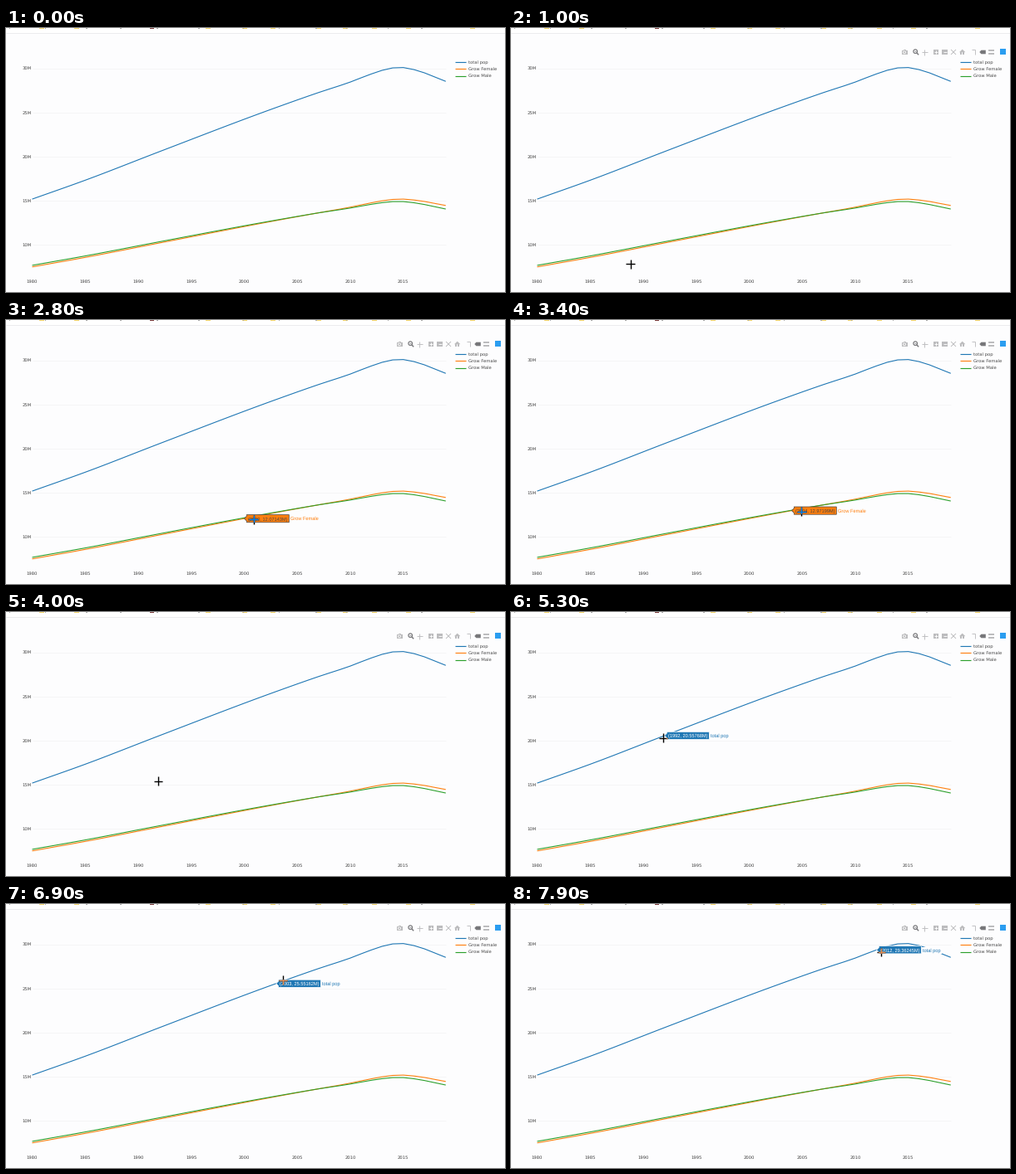
A matplotlib script for the animation above (8000 ms loop, 600 by 318 pixels).

```python
import random

import numpy as np
import matplotlib.pyplot as plt
from matplotlib.animation import FuncAnimation
from matplotlib.colors import to_rgb
from matplotlib.patches import Circle, Polygon, Rectangle

W, H, DPI = 600, 318, 100
PT = 72 / DPI                      # points per pixel
FRAMES, INTERVAL = 80, 100
PAPER, INK, ICON, ACTIVE = "#fdfdfe", "#444444", "#bcbcbe", "#77777a"
BLUE, ORANGE, GREEN = "#1f77b4", "#ff7f0e", "#2ca02c"

plt.rcParams["text.hinting"] = "none"
plt.rcParams["toolbar"] = "None"

fig = plt.figure(figsize=(W / DPI, H / DPI), dpi=DPI, facecolor=PAPER)
ax = fig.add_axes([0, 0, 1, 1])
ax.set_xlim(0, W)
ax.set_ylim(H, 0)
ax.axis("off")


def line(xs, ys, color, width=1.0, z=2, **kw):
    kw.setdefault("solid_capstyle", "butt")
    return ax.plot(xs, ys, color=color, lw=width * PT, zorder=z, **kw)[0]


def rect(x, y, w, h, color, z=2):
    return ax.add_patch(Rectangle((x, y), w, h, fc=color, ec="none", zorder=z))


def poly(points, color):
    return ax.add_patch(Polygon(points, fc=color, ec="none", zorder=2))


def ring(x, y, r, fc, ec, width):
    return ax.add_patch(Circle((x, y), r, fc=fc, ec=ec, lw=width * PT, zorder=3))


def text(x, y, s, size=5.2, color=INK, ha="left", font="DejaVu Sans", z=3):
    return ax.text(x, y, s, fontsize=size * PT, color=color, ha=ha,
                   va="center_baseline", family=font, zorder=z)


# ---------- data ----------
def smooth(x, keys):
    """Cubic Hermite curve through a few (x, y) keys."""
    kx, ky = np.array(keys).T
    slope = np.gradient(ky, kx)
    i = np.clip(np.searchsorted(kx, x, "right") - 1, 0, len(kx) - 2)
    h = kx[i + 1] - kx[i]
    u = (x - kx[i]) / h
    ease = u * u * (3 - 2 * u)
    return (ky[i] * (1 - ease) + ky[i + 1] * ease
            + h * u * (1 - u) * (slope[i] * (1 - u) - slope[i + 1] * u))


years = np.arange(1980, 2020)
total = smooth(years, [
    (1980, 15.18261), (1985, 17.31974), (1992, 20.55768), (2003, 25.55162),
    (2007, 27.2476), (2010, 28.43994), (2012, 29.36245), (2014, 30.04297),
    (2015, 30.08183), (2016, 29.85124), (2019, 28.51583)])
share = np.interp(years, [1980, 2000, 2007, 2019], [.4942, .49825, .5, .507])
female = total * share
series = [("total pop", total, BLUE),
          ("Grow Female", female, ORANGE),
          ("Grow Male", total - female, GREEN)]


def px(year):
    return 31.5 + (year - 1980) * 12.75


def py(millions):
    return 261.2 - (millions - 10) * 10.635


# ---------- browser strip ----------
rng = random.Random(4)
rect(0, 0, W, 5.5, "#ffffff", 0)
line([0, W], [6, 6], "#e8e8ea", 0.8, 1)
for x in (43, 85, 243, 287, 321, 376, 408, 443, 484, 561):
    rect(x - 3, 0, 6, 1, "#f3d56b")
for x in range(8, 545, 45):
    rect(x + rng.uniform(-8, 8), 0, 1.6, 0.8, "#a8a8a8")
rect(173, 0, 5, 1, "#7a3a3a")

# ---------- chart ----------
for m in range(10, 31, 5):
    line([31.5, 529], [py(m)] * 2, "#f3f3f4", 0.8, 1)
    text(31, py(m), f"{m}M", ha="right")
for year in range(1980, 2016, 5):
    text(px(year), 305, str(year), ha="center")
for i, (name, values, color) in enumerate(series):
    line(px(years), py(values), color, 1.1, 4, solid_joinstyle="round")
    y = 41 + 8.25 * i
    line([540.3, 552.8], [y, y], color, 1.15)
    text(556, y, name)


# ---------- toolbar ----------
MID = 29


def stroke(x0, y0, x1, y1, color=ICON, width=0.9):
    """Icon stroke, y measured from the toolbar's centre line."""
    return line([x0, x1], [MID + y0, MID + y1], color, width)


def block(x, y, w, h, color=ICON):
    return rect(x - w / 2, MID + y - h / 2, w, h, color)


tools = [
    # camera
    block(473, 0.3, 7, 5), block(473, -2.6, 3, 1.2),
    ring(473, 29.3, 1.5, ICON, "white", 0.8),
    # zoom
    ring(486.2, 28.2, 2.3, "none", ACTIVE, 1.2),
    stroke(487.8, 0.9, 490.2, 3.3, ACTIVE, 1.4),
    stroke(485, -0.8, 487.4, -0.8, ACTIVE, 0.7),
    # pan
    stroke(493.6, 0, 500.6, 0), stroke(497.1, -3.5, 497.1, 3.5),
    # zoom in, zoom out
    block(511, 0, 6.2, 6), block(521.5, 0, 6.2, 6),
    stroke(509, 0, 513, 0, "white"), stroke(511, -2, 511, 2, "white"),
    stroke(519.5, 0, 523.5, 0, "white"),
    # autoscale
    stroke(529, -3, 535, 3), stroke(529, 3, 535, -3),
    # home
    poly([(539, 29.2), (542.7, 25.7), (546.4, 29.2)], ICON),
    block(541.2, 1.5, 1.9, 3), block(544.2, 1.5, 1.9, 3),
    # spikes
    stroke(554, -2.7, 558.3, -2.7), stroke(558.3, -2.7, 558.3, 2.8),
    # hover modes
    poly([(563.3, 29), (565.4, 26.7), (570.8, 26.7), (570.8, 31.3),
          (565.4, 31.3)], ACTIVE),
    block(577.7, -1.7, 6.5, 2.2), block(577.7, 1.7, 6.5, 2.2),
    block(591.2, -0.2, 7, 7, "#2b9df0"),
]

# ---------- hover label ----------
TIP, BOX_W, HALF = 2.8, 51, 4.6
RIGHT = TIP + BOX_W
BODY = np.array([(0, 0), (TIP, -TIP), (TIP, -HALF), (RIGHT, -HALF),
                 (RIGHT, HALF), (TIP, HALF), (TIP, TIP)])
bubble = ax.add_patch(Polygon(BODY, closed=True, lw=0.7 * PT, zorder=7))
area = Rectangle((0, 0), BOX_W, 2 * HALF, transform=ax.transData)
value_text = text(0, 0, "", 5.7, ha="center", font="Liberation Sans", z=8)
name_text = text(0, 0, "", 5.7, font="Liberation Sans", z=6)
name_text.set_bbox(dict(fc=PAPER, ec="none", pad=1.5 * PT))

# ---------- cursor ----------
ARM = 5.4
cross = [line([], [], "black", 1.4, 9) for _ in range(2)]
inverse = [line([], [], "black", 1.4, 10) for _ in range(2)]

# time in s, x, y
PATH = np.array([
    (0.7, 137, 298), (1.4, 153, 266), (1.7, 205, 255.5), (2.5, 258, 247),
    (2.6, 258, 247), (2.7, 289, 242), (3.5, 358, 229), (4.0, 183, 203.5),
    (4.4, 104, 176), (5.2, 183, 151.5), (5.4, 183, 151.5), (6.3, 283, 112),
    (6.9, 333, 91.8), (7.8, 439, 60), (7.9, 445, 58)])
START = PATH[0, 0]


def cursor_at(t):
    return [np.interp(t, PATH[:, 0], PATH[:, k]) for k in (1, 2)]


def nearest(x, y, reach=10):
    best = None
    for name, values, color in series:
        d = np.hypot(px(years) - x, py(values) - y)
        i = d.argmin()
        if d[i] < reach:
            reach, best = d[i], (name, years[i], values[i], color)
    return best


def place_cross(lines, x, y):
    lines[0].set_data([x - ARM, x + ARM], [y, y])
    lines[1].set_data([x, x], [y - ARM, y + ARM])


def show_label(name, year, value, color):
    x, y = px(year), py(value)
    contrast = "white" if color == BLUE else INK
    bubble.set_xy(BODY + (x, y))
    bubble.set(facecolor=color, edgecolor=contrast)
    value_text.set(position=(x + TIP + BOX_W / 2, y), color=contrast,
                   text=f"({year}, {value:.5f}M)")
    name_text.set(position=(x + RIGHT + 1.3, y), color=color, text=name)
    area.set_xy((x + TIP, y - HALF))
    # the pointer inverts what lies under it
    for part in inverse:
        part.set_color(1 - np.array(to_rgb(color)))
        part.set_clip_path(area)


def draw(i):
    t = i * INTERVAL / 1000
    fade = np.clip((t - 0.55) / 0.3, 0, 1)
    for part in tools:
        part.set_alpha(fade)

    active = t >= START - 1e-6
    for pair in (cross, inverse):
        place_cross(pair, *cursor_at(t))
    # the label trails the pointer by one step
    hit = nearest(*cursor_at(t - INTERVAL / 1000)) if active else None
    for part in cross:
        part.set_visible(active)
    for part in (bubble, value_text, name_text, *inverse):
        part.set_visible(hit is not None)
    if hit:
        show_label(*hit)
    return []


anim = FuncAnimation(fig, draw, frames=FRAMES, interval=INTERVAL,
                     init_func=lambda: draw(0), repeat=True, repeat_delay=0)
plt.show()
```
